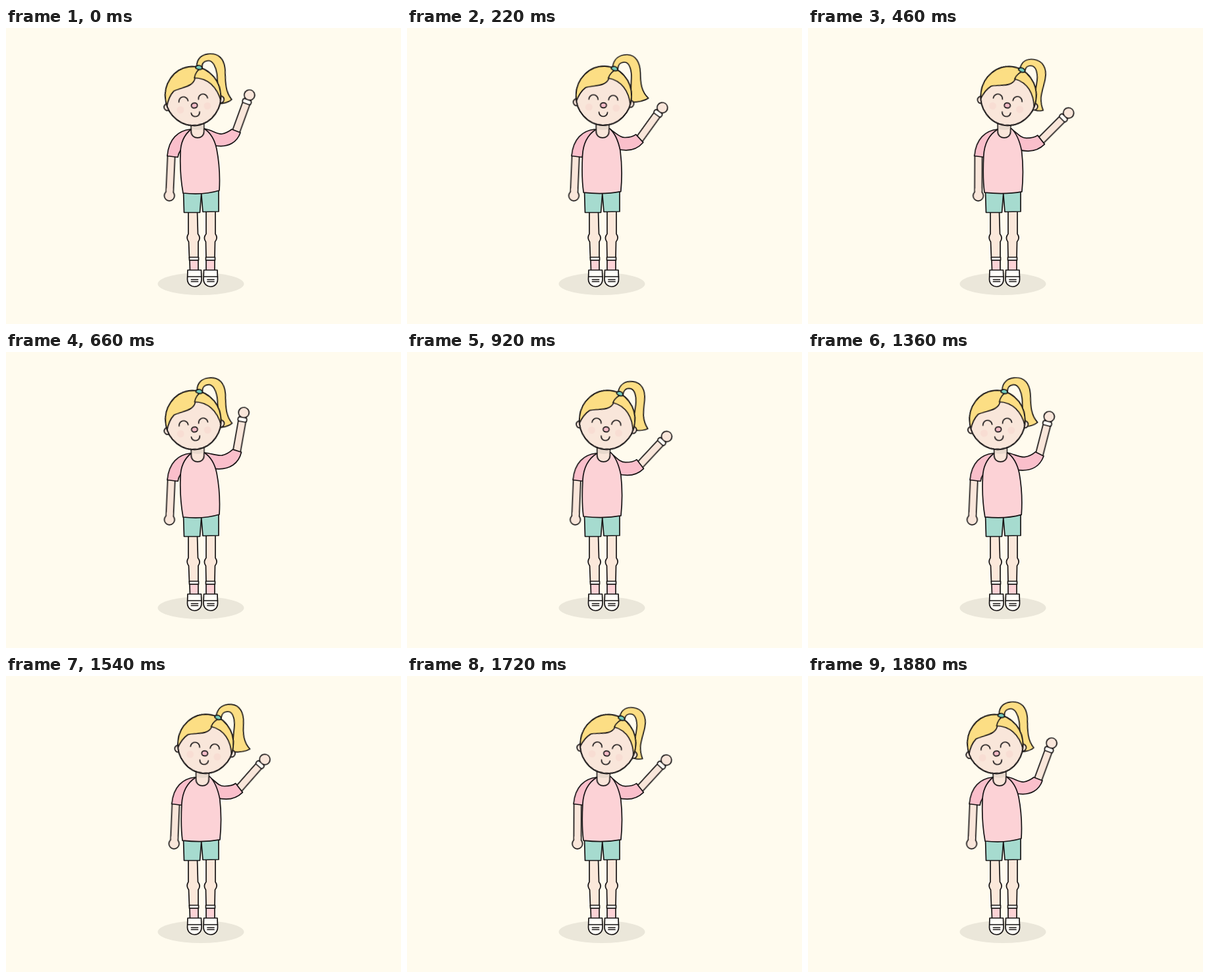
An HTML page without scripts for the animation above (1.9 s loop, 600 by 450 pixels).

```html
<!DOCTYPE html>
<html lang="en">
<head>
<meta charset="utf-8">
<title>Waving girl</title>
<style>
  html, body { margin: 0; width: 100%; height: 100%; overflow: hidden; background: #fffbee; }
  svg { display: block; width: 600px; height: 450px; }

  .ink { stroke: #171415; stroke-width: 1.7; stroke-linejoin: round; stroke-linecap: round; }
  .line { fill: none; }
  .skin { fill: #f9e6da; }
  .leg { fill: #fbe8da; }
  .hair { fill: #fcde84; }
  .shirt { fill: #fcd2d6; }
  .sleeve { fill: #fabfcb; }
  .teal { fill: #a6dbcf; }
  .white { fill: #fffdf8; }
  .blush { fill: #f8ddd3; }

  .move {
    animation: 1.9s cubic-bezier(.37, 0, .63, 1) infinite;
    --sway: calc(1.9s / 3);
  }
  .torso { animation-name: torso; animation-duration: var(--sway); }
  .neck { animation-name: neck; animation-duration: var(--sway); }
  .head { animation-name: head; animation-duration: var(--sway); transform-origin: 293px 153px; }
  .side { animation-name: side; animation-duration: var(--sway); }
  .hang { animation-name: hang; animation-duration: var(--sway); transform-origin: 251px 194px; }
  .raised { animation-name: raised; }
  .elbow { animation-name: elbow; }
  .wave { animation-name: wave; }
  .tail { animation-name: tail; }

  @keyframes torso {
    0%, 91.6%, 100% { d: path("M281 154C269 164 265 176 265 190C264 212 266 234 269 251C288 253 308 252 324 247C325 230 324 205 320 184C317 170 312 160 301 153Z"); }
    50.5%, 68% { d: path("M289 154C274 163 268 178 267 195C266 215 266 235 268 250C286 252 308 252 325 249C327 230 327 205 325 187C322 172 318 161 310 153Z"); }
  }
  @keyframes neck {
    0%, 91.6%, 100% { transform: translate(-1.8px, 0); }
    50.5%, 68% { transform: translate(6px, 0); }
  }
  @keyframes head {
    0%, 100% { transform: rotate(-8.2deg); }
    64.5% { transform: rotate(9.5deg); }
  }
  @keyframes side {
    0%, 100% { transform: translate(0, 0); }
    64.5% { transform: translate(9px, 0); }
  }
  @keyframes hang {
    0%, 100% { transform: rotate(2.6deg); }
    45% { transform: rotate(2.4deg); }
    72% { transform: rotate(.3deg); }
    83% { transform: rotate(-3.2deg); }
    97% { transform: rotate(2.4deg); }
  }
  @keyframes raised {
    0%, 97.2%, 100% { d: path("M300 153C312 154 320 162 328 161C334 160 339 157 343 154L356 159C352 171 340 184 314 178Z"); }
    16.8%, 22.6%, 50.2%, 56%, 83.5%, 89.3% { d: path("M308 153C317 158 322 168 332 168C339 168 345 167 349 164L359.500 178C350 187 338 191 319 185Z"); }
    33.7%, 65.8% { d: path("M300 153C312 154 320 158 328 157C334 156 340 152 344.500 148L357.500 152C354 167 342 181 314 177Z"); }
  }
  @keyframes elbow {
    0%, 97.2%, 100% { transform: translate(350px, 156.5px); }
    16.8%, 22.6%, 50.2%, 56%, 83.5%, 89.3% { transform: translate(355px, 171.5px); }
    33.7%, 65.8% { transform: translate(351px, 149px); }
  }
  @keyframes wave {
    0%, 99.7%, 100% { transform: rotate(20deg); }
    21.8%, 53.2%, 86.6% { transform: rotate(48.5deg); }
    34.2%, 67.4% { transform: rotate(10deg); }
  }
  @keyframes tail {
    0%, 33.3%, 66.7%, 100% { d: path("M305 60C306 47 316 42 327 43C341 44 348 54 347 70C345 88 342 103 350.500 116.500C345 120 338 121 330 120L333.500 80C335 64 330 53 323 53C316 53 313 57 313 62Z"); }
    12.1%, 45.3%, 80.5% { d: path("M305 60C306 46 315 40 326 39.500C340 39 346.500 51 347.500 66C348 82 350 95 361 104.500C355 109 348 111 334 111.500L334 80C335 64 331 51 323 51C316 51 313 56 313 62Z"); }
    21%, 27.7%, 52.6%, 61%, 89%, 94.2% { d: path("M305 60C306 48 314 43 324 43C338 43 346 54 345 70C344 88 338 100 348 118C343 120 336 120 331 118L333 80C334 64 329 53 322 53C316 53 313 57 313 62Z"); }
  }
</style>
</head>
<body>
<svg viewBox="0 0 600 450">
  <defs>
    <clipPath id="skull"><ellipse cx="293" cy="103" rx="42.200" ry="44.800"/></clipPath>
    <g id="shoe">
      <path class="white" d="M276 368H296.500L297 382C297 397 276 397 275.500 382Z"/>
      <path class="line" d="M276 378H297M281.500 382.500H291.500M281.500 385.500H291.500"/>
    </g>
  </defs>

  <ellipse cx="296" cy="389" rx="65.500" ry="17" fill="#ebe7da"/>

  <g class="ink">
    <!-- legs -->
    <path class="leg" d="M277 278V313Q273 319 277.500 325L278.500 350H292V325Q296.500 319 291.500 313L290.500 278Z"/>
    <path class="leg" d="M304 278V313Q299 319 303.500 325L304 350H317L317.500 325Q322.500 319 318 313V278Z"/>
    <path class="shirt" d="M279 353H292V369H279.500ZM304 353H317V369H304Z"/>
    <path class="white" d="M278.500 348.500H292.500V353H278.500ZM303.500 348.500H317.500V353H303.500Z"/>
    <use href="#shoe"/>
    <use href="#shoe" x="24.500"/>
    <path class="teal" d="M269.500 247L270.500 280.500H294.500L297 249Z"/>
    <path class="teal" d="M296.500 249L299 279.500L323 279V245Z"/>

    <!-- hanging arm -->
    <g class="move side">
      <g class="move hang">
        <path class="skin" d="M245.500 193V250H256.700V193Z"/>
        <circle class="skin" cx="251" cy="255" r="7.800"/>
        <path class="skin" stroke="none" d="M246.300 244H255.900V250H246.300Z"/>
      </g>
      <path class="sleeve" d="M280 154C262 156 247 168 245 194.500L261 196.500C261.500 192 263 189 265 186L277 180Z"/>
    </g>

    <!-- waving arm -->
    <g class="move elbow">
      <g class="move wave">
        <path class="skin" d="M-6 5V-50H5.500V5Z"/>
        <circle class="skin" cx="0" cy="-58" r="8"/>
        <rect class="white" x="-7" y="-50.500" width="13.500" height="6.500" rx="2.500"/>
      </g>
    </g>
    <path class="sleeve move raised"/>

    <path class="shirt move torso"/>

    <g class="move neck">
      <path class="skin" d="M283 140V157.500C283 170 302.500 170 302.500 157.500V140"/>
      <path d="M283.800 142V153Q293 157 301.700 153V142Z" fill="#e8d9cd" stroke="none"/>

      <g class="move head">
        <path class="hair move tail"/>
        <circle class="skin" cx="252.500" cy="114" r="5.500"/>
        <circle class="skin" cx="333.500" cy="114" r="5.500"/>
        <ellipse class="skin" cx="293" cy="103" rx="42.200" ry="44.800"/>
        <g clip-path="url(#skull)">
          <path class="hair" d="M243 119L251 114C254 105 258 97 265 91.500C276 87 296 90 300 76L314 60V40H243Z"/>
          <path class="hair" d="M299 76C301 69 305 66 312 61L330 45L345 50V121L334 117C331 94 319 79 299 76Z"/>
        </g>
        <ellipse class="line" cx="293" cy="103" rx="42.200" ry="44.800"/>
        <path d="M303 61.500Q303.500 57.500 308 58Q313 59 313 63.500Q308 66.500 303 61.500Z" fill="#74cdbf"/>

        <g stroke="none" class="blush">
          <circle cx="271" cy="121" r="5.500"/>
          <circle cx="312.500" cy="121" r="5.500"/>
        </g>
        <path class="line" d="M270.500 109A7 7 0 0 1 284.500 109M300.500 109A7 7 0 0 1 314.500 109M286.500 128A6.500 6.500 0 0 0 299.500 128"/>
        <ellipse cx="293" cy="117.500" rx="4.600" ry="3.900" fill="#f4bcc8"/>
      </g>
    </g>
  </g>
</svg>
</body>
</html>
```
